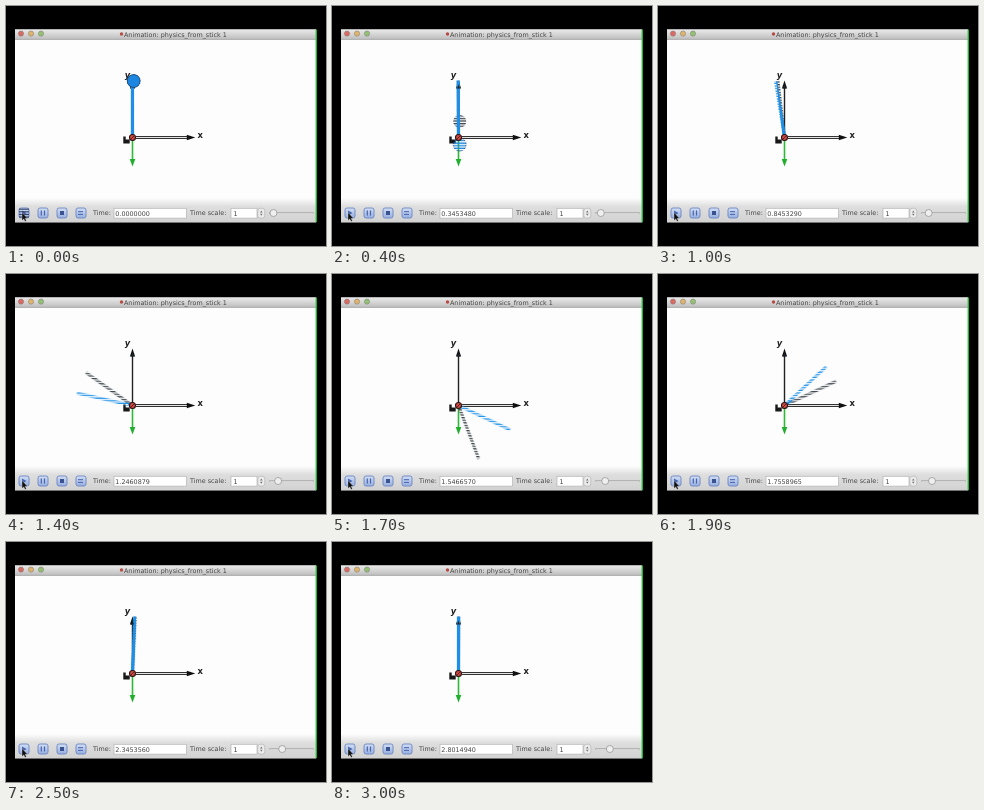
Recreate the animation shown at these times as an HTML page. Size 320x240 px, loop 3300 ms.

```html
<!DOCTYPE html>
<html lang="en">
<head>
<meta charset="utf-8">
<title>Falling stick and ball</title>
<style>
html, body { margin: 0; width: 100%; height: 100%; overflow: hidden; background: #000; }
svg { display: block; width: 100vw; height: 100vh; }
text { font-family: "DejaVu Sans", sans-serif; font-size: 6.4px; fill: #444; }
.axis { font-weight: bold; font-size: 8.4px; fill: #222; }
</style>
</head>
<body>
<svg viewBox="0 0 320 240">
  <defs>
    <linearGradient id="title" x2="0" y2="1">
      <stop stop-color="#e9e9e9"/><stop offset=".5" stop-color="#d4d4d4"/><stop offset="1" stop-color="#bcbcbc"/>
    </linearGradient>
    <linearGradient id="bar" x2="0" y2="1">
      <stop stop-color="#fdfdfd"/><stop offset=".35" stop-color="#dedede"/><stop offset="1" stop-color="#d2d2d2"/>
    </linearGradient>
    <linearGradient id="button" x2="0" y2="1">
      <stop stop-color="#d3def4"/><stop offset="1" stop-color="#96afe0"/>
    </linearGradient>
    <pattern id="evenRows" width="4" height="2.6" patternUnits="userSpaceOnUse">
      <rect width="4" height="1.3" fill="#fff"/>
    </pattern>
    <pattern id="oddRows" width="4" height="2.6" patternUnits="userSpaceOnUse">
      <rect y="1.3" width="4" height="1.3" fill="#fff"/>
    </pattern>
    <mask id="even" maskUnits="userSpaceOnUse" x="0" y="0" width="320" height="240">
      <rect width="320" height="240" fill="url(#evenRows)"/>
    </mask>
    <mask id="odd" maskUnits="userSpaceOnUse" x="0" y="0" width="320" height="240">
      <rect width="320" height="240" fill="url(#oddRows)"/>
    </mask>
    <clipPath id="view"><rect x="9" y="34" width="301" height="163"/></clipPath>
    <rect id="stick" x="124.9" y="74.5" width="3.2" height="57"/>
    <circle id="ball" cx="127.7" cy="75" r="6.5"/>
    <clipPath id="oldStick"><rect class="was" x="124.9" y="74.5" width="3.2" height="57"/></clipPath>
    <clipPath id="oldBall"><circle id="oldBallShape" cx="127.7" r="6.9"/></clipPath>
  </defs>

  <rect width="320" height="240"/>
  <rect x="9" y="23.5" width="301" height="192.8" fill="#fdfdfd"/>
  <rect x="9" y="23.5" width="301" height="10" fill="url(#title)"/>
  <path d="M9 33.4H310" stroke="#a2a2a2" stroke-width=".8"/>
  <g stroke="#777" stroke-width=".5">
    <circle cx="15" cy="27.6" r="2.6" fill="#dc6a62"/>
    <circle cx="25" cy="27.6" r="2.6" fill="#e0b46a"/>
    <circle cx="35" cy="27.6" r="2.6" fill="#93c072"/>
  </g>
  <circle cx="115.5" cy="28" r="1.7" fill="#b84a45"/>
  <text x="118" y="30.5">Animation: physics_from_stick 1</text>

  <rect x="9" y="192" width="301" height="24.3" fill="url(#bar)"/>

  <g clip-path="url(#view)">
    <path d="M126.5 131.5V80" stroke="#222" stroke-width="1.4"/>
    <path d="M126.5 74.5l2.6 8h-5.2z" fill="#111"/>
    <path d="M130 131.5H182" stroke="#333" stroke-width="3"/>
    <path d="M130 131.5H181" stroke="#e4e4e4" stroke-width="1.2"/>
    <path d="M189.3 131.5l-8.5 -2.8v5.6z" fill="#111"/>
    <path d="M126.5 131.5V154" stroke="#2cba38" stroke-width="1.6"/>
    <path d="M126.5 160.5l-2.8 -7.5h5.6z" fill="#22ae2f"/>
    <text class="axis" x="191.5" y="132.4">x</text>
    <text class="axis" x="118.8" y="72" font-style="italic">y</text>
    <path d="M117.3 130.5h2.4v3h4v4h-6.4z" fill="#181818"/>

    <g mask="url(#even)">
      <use class="was" href="#stick" fill="#3c434a"/>
      <use class="ballWas" href="#ball" fill="#3a444e"/>
    </g>
    <g mask="url(#odd)">
      <use class="now" href="#stick" fill="#1c90e8"/>
      <use class="ballNow" href="#ball" fill="#1c86e0" stroke="#123a63" stroke-width=".8"/>
    </g>
    <g clip-path="url(#oldStick)"><use class="now" href="#stick" fill="#1c90e8"/></g>
    <g clip-path="url(#oldBall)">
      <use class="ballNow" href="#ball" fill="#1c86e0" stroke="#123a63" stroke-width=".8"/>
    </g>
    <path id="tip" d="M126.5 78.5l1.5 4h-3z" fill="#1a2530"/>
    <circle cx="126.5" cy="131.5" r="3" fill="#cf4a44" stroke="#2a1212" stroke-width="1.1"/>
    <path d="M124.5 133.5l4 -4" stroke="#4a1614" stroke-width=".8"/>
  </g>

  <g id="buttons"></g>
  <g stroke="#4563ac" stroke-width="1.2" fill="none">
    <path d="M16 204.5l4.5 2.6l-4.5 2.6z" fill="#4563ac" stroke="none"/>
    <path d="M35.3 204.5v5M38.5 204.5v5"/>
    <path d="M54 205h4v4h-4z" fill="#3a5290" stroke="none"/>
    <path d="M72 205.7h5M72 208.4h5" stroke-width="1"/>
  </g>
  <g id="pressed" stroke="#26355c" stroke-width="1">
    <path d="M13 203.2h10M13 205.8h10M13 208.4h10M13 211h10"/>
  </g>
  <text x="87" y="209.4">Time:</text>
  <text x="184" y="209.4">Time scale:</text>
  <g fill="#fff" stroke="#b4b4b4" stroke-width=".7">
    <rect x="108" y="202.3" width="72.5" height="9.8"/>
    <rect x="225" y="202.3" width="26" height="9.8"/>
    <rect x="251.8" y="202.3" width="7" height="9.8" rx="2.5" fill="#ececec"/>
  </g>
  <path d="M255.3 204.6l1.3 2h-2.6zM255.3 209.8l1.3 -2h-2.6z" fill="#777"/>
  <text id="clock" x="109.3" y="209.5"></text>
  <text x="227.5" y="209.5">1</text>
  <path d="M264 207H307" stroke="#b0b0b0" stroke-width="2" stroke-linecap="round"/>
  <path d="M264 207.4H307" stroke="#dedede" stroke-width=".9"/>
  <circle id="knob" cy="207" r="3.5" fill="#efefef" stroke="#999" stroke-width=".8"/>
  <path d="M16 206.5v8l1.8 -1.6l1.3 2.6l1.3 -.7l-1.3 -2.5h2.4z" fill="#111" stroke="#fff" stroke-width=".3"/>
  <path d="M310.2 23.5V216.3" stroke="#2bd03c" stroke-width="1.3"/>
</svg>
<script>
const LOOP = 3300, STEP = 100, LAST = 3000;
const $ = id => document.getElementById(id);
const setAll = (cls, value) =>
  document.querySelectorAll('.' + cls).forEach(el => el.setAttribute('transform', value));

// wall time, simulated seconds, swing phase, phase lag of the trailing field
const keys = [
  [0, 0, -8.5, .4],
  [400, .345348, -6.43, .4],
  [1000, .845329, -3.24, .3],
  [1700, 1.546657, .598, .416],
  [2100, 1.965136, 2.54, .25],
  [2500, 2.345356, 4.74, .3],
  [3000, 2.801494, 7.4, .3]
];

function sample(t) {
  const i = Math.max(1, keys.findIndex(k => k[0] >= t));
  const a = keys[i - 1], b = keys[i], f = (t - a[0]) / (b[0] - a[0]);
  return a.map((v, n) => v + (b[n] - v) * f);
}

// a pendulum that leaves the upright and returns to it after one turn
const swing = phase => -4 * Math.atan(Math.exp(phase)) * 180 / Math.PI;
const drop = s => 533 * Math.max(0, s) ** 2;
const turn = phase => `rotate(${swing(phase)} 126.5 131.5)`;

$('buttons').innerHTML = [18, 37, 56, 75].map(x =>
  `<rect x="${x - 5}" y="202" width="10" height="10" rx="2" fill="url(#button)" stroke="#6d87c2" stroke-width=".9"/>`
).join('');

function draw(ms) {
  const t = Math.min(LAST, Math.floor(ms % LOOP / STEP) * STEP);
  const [, s, phase, lag] = sample(t);
  const before = drop(s - .07), now = drop(s);
  setAll('now', turn(phase));
  setAll('was', turn(phase - lag));
  setAll('ballNow', `translate(0 ${now})`);
  setAll('ballWas', `translate(0 ${before})`);
  $('oldBallShape').setAttribute('cy', 75 + before);
  $('clock').textContent = s.toFixed(7);
  $('knob').setAttribute('cx', 267.5 + 3.7 * s);
  $('pressed').style.display = t ? 'none' : '';
  $('tip').style.display = t ? '' : 'none';
}

const start = performance.now();
function tick() {
  draw(performance.now() - start);
  requestAnimationFrame(tick);
}
tick();
</script>
</body>
</html>
```
